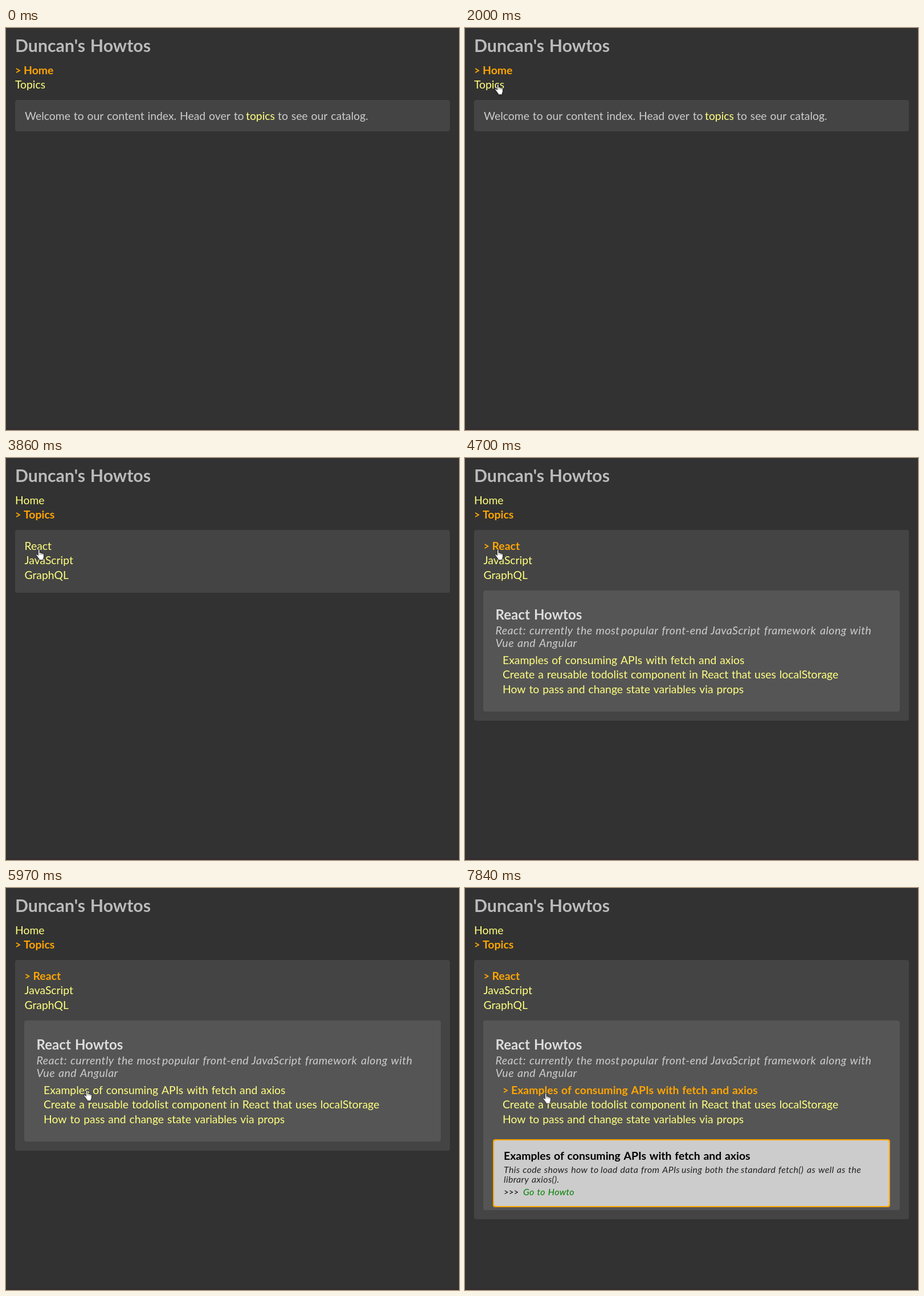
Recreate the animation shown at these times as an HTML page with a canvas. Size 795x704 px, loop 7.99 s.

```html
<!DOCTYPE html>
<html lang="en">
<head>
<meta charset="utf-8">
<title>Howtos</title>
<style>
  html, body { margin: 0; width: 100%; height: 100%; overflow: hidden; background: #323232; }
  canvas { display: block; }
</style>
</head>
<body>
<canvas id="stage" width="795" height="704"></canvas>
<script>
const ctx = document.getElementById("stage").getContext("2d");
const LOOP = 7990;
const TOPICS_AT = 2550, REACT_AT = 4700, HOWTO_AT = 6380;
const LINK = "#ffff80", ACTIVE = "#ffa500", TEXT = "#cccccc";

// time, shape, left, top
const pointer = [
  [460, "arrow", 556, 683], [610, "arrow", 358, 530],
  [760, "arrow", 260, 405], [880, "arrow", 190, 322],
  [1030, "arrow", 131, 228], [1150, "arrow", 104, 178], [1270, "arrow", 78, 120],
  [1420, "hand", 52, 82], [1570, "hand", 52, 83],
  [1720, "hand", 52, 89], [1840, "hand", 52, 96], [2000, "hand", 52, 98],
  [3010, "hand", 52, 99], [3300, "hand", 51, 102],
  [3450, "arrow", 56, 123], [3590, "arrow", 56, 136],
  [3710, "hand", 51, 151], [3860, "hand", 52, 160],
  [5130, "hand", 58, 167], [5280, "hand", 88, 206],
  [5430, "arrow", 108, 246], [5560, "beam", 120, 282], [5710, "arrow", 135, 337],
  [5850, "hand", 133, 346], [5970, "hand", 136, 354], [7840, "hand", 136, 359]
];

const shapes = {
  arrow: new Path2D("M.5 .5V16.5L4.3 12.9L7 18.4L9.3 17.4L6.8 12H11.6Z"),
  hand: new Path2D("M5 2.5Q5 .7 6.5 .7Q8 .7 8 2.5V7Q8.2 6 9.5 6.2Q11 6.4 11 8" +
    "Q11.3 7 12.5 7.2Q13.8 7.5 13.8 9Q14.2 8.2 15.2 8.5Q16.4 9 16.4 10.5V14.5" +
    "Q16.4 16.5 15 18.5V21.3H7V19Q4.5 16.5 2.5 13.2Q.3 11 1 10Q2 9 3.5 10.2L5 12Z"),
  knuckles: new Path2D("M8 7V11M11 8V11M13.8 9V11.5"),
  beam: new Path2D("M.5 .5H2.5L3.5 1.5L4.5 .5H6.5M3.5 1.5V13.5M.5 14.5H2.5L3.5 13.5L4.5 14.5H6.5")
};

function text(str, x, y, color, size = 19.35, style = "", spacing = 0) {
  ctx.font = `${style} ${size}px Lato, sans-serif`;
  ctx.wordSpacing = `${size * 0.05}px`;
  ctx.letterSpacing = `${size * spacing}px`;
  ctx.fillStyle = color;
  ctx.fillText(str, x, y);
}

const bold = (str, x, y, color, size = 19.45) => text(str, x, y, color, size, "bold");
const italic = (str, x, y, color, size = 19.6) => text(str, x, y, color, size, "italic", 0.022);

function link(str, x, y, active) {
  if (!active) return text(str, x, y, LINK);
  bold(">", x, y, ACTIVE, 18);
  bold(str, x + 15, y, ACTIVE);
}

function panel(left, top, right, bottom, color) {
  ctx.fillStyle = color;
  ctx.beginPath();
  ctx.roundRect(left, top, right - left, bottom - top, 4);
  ctx.fill();
}

function drawHome() {
  panel(16, 126, 779, 181, "#444444");
  text("Welcome to our content index. Head over to", 33, 161, TEXT);
  text("topics", 421, 161, LINK);
  text("to see our catalog.", 477, 161, TEXT);
}

function drawTopics(react, howto) {
  panel(16, 126, 779, howto ? 580 : react ? 460 : 236, "#444444");
  link("React", 32.5, 161, react);
  link("JavaScript", 32.5, 186);
  link("GraphQL", 32.5, 212);
  if (react) drawReact(howto);
}

function drawReact(howto) {
  panel(32, 232, 763, howto ? 564 : 444, "#555555");
  bold("React Howtos", 53.5, 283, "#dddddd", 24.1);
  italic("React: currently the most", 53.5, 309, TEXT);
  italic("popular front-end", 274, 309, TEXT);
  italic("JavaScript framework", 431, 309, TEXT);
  italic("along with", 623, 309, TEXT);
  italic("Vue and Angular", 53.5, 331, TEXT);
  link("Examples of consuming APIs with fetch and axios", 66, 361, howto);
  link("Create a reusable todolist component in React that uses localStorage", 66, 386);
  link("How to pass and change state variables via props", 66, 412);
  if (howto) drawHowto();
}

function drawHowto() {
  panel(49, 440, 746, 559, ACTIVE);
  panel(51, 442, 744, 557, "#cccccc");
  bold("Examples of consuming APIs with fetch and axios", 68, 476, "#000000");
  const note = (str, x, y) => italic(str, x, y, "#222222", 15.9);
  note("This code shows how to", 68, 499);
  note("load data from APIs", 238, 499);
  note("using both the", 380, 499);
  note("standard fetch()", 484, 499);
  note("as well as the", 600, 499);
  note("library axios().", 68, 516);
  text(">>>", 68, 538, "#000000", 15);
  italic("Go to Howto", 102, 538, "#008000", 15.9);
}

function drawPointer(t) {
  const step = pointer.filter(p => p[0] <= t).pop();
  if (!step) return;
  const [, kind, x, y] = step;
  ctx.save();
  ctx.translate(x, y);
  ctx.scale(0.88, 0.88);
  ctx.lineJoin = "round";
  ctx.lineWidth = 0.9;
  ctx.fillStyle = "#ffffff";
  ctx.strokeStyle = kind === "beam" ? "#ffffff" : "#000000";
  if (kind !== "beam") ctx.fill(shapes[kind]);
  ctx.stroke(shapes[kind]);
  ctx.lineWidth = 0.6;
  if (kind === "hand") ctx.stroke(shapes.knuckles);
  ctx.restore();
}

function draw(now) {
  const t = now % LOOP;
  const topics = t >= TOPICS_AT;
  ctx.fillStyle = "#323232";
  ctx.fillRect(0, 0, 795, 704);
  ctx.fillStyle = "#332d30";
  ctx.fillRect(0, 701, 795, 3);
  bold("Duncan's Howtos", 16, 42, "#bbbbbb", 30.3);
  link("Home", 16, 81, !topics);
  link("Topics", 16, 106, topics);
  if (topics) drawTopics(t >= REACT_AT, t >= HOWTO_AT);
  else drawHome();
  drawPointer(t);
}

const start = performance.now();
function tick() {
  draw(performance.now() - start);
  requestAnimationFrame(tick);
}
tick();
</script>
</body>
</html>
```
